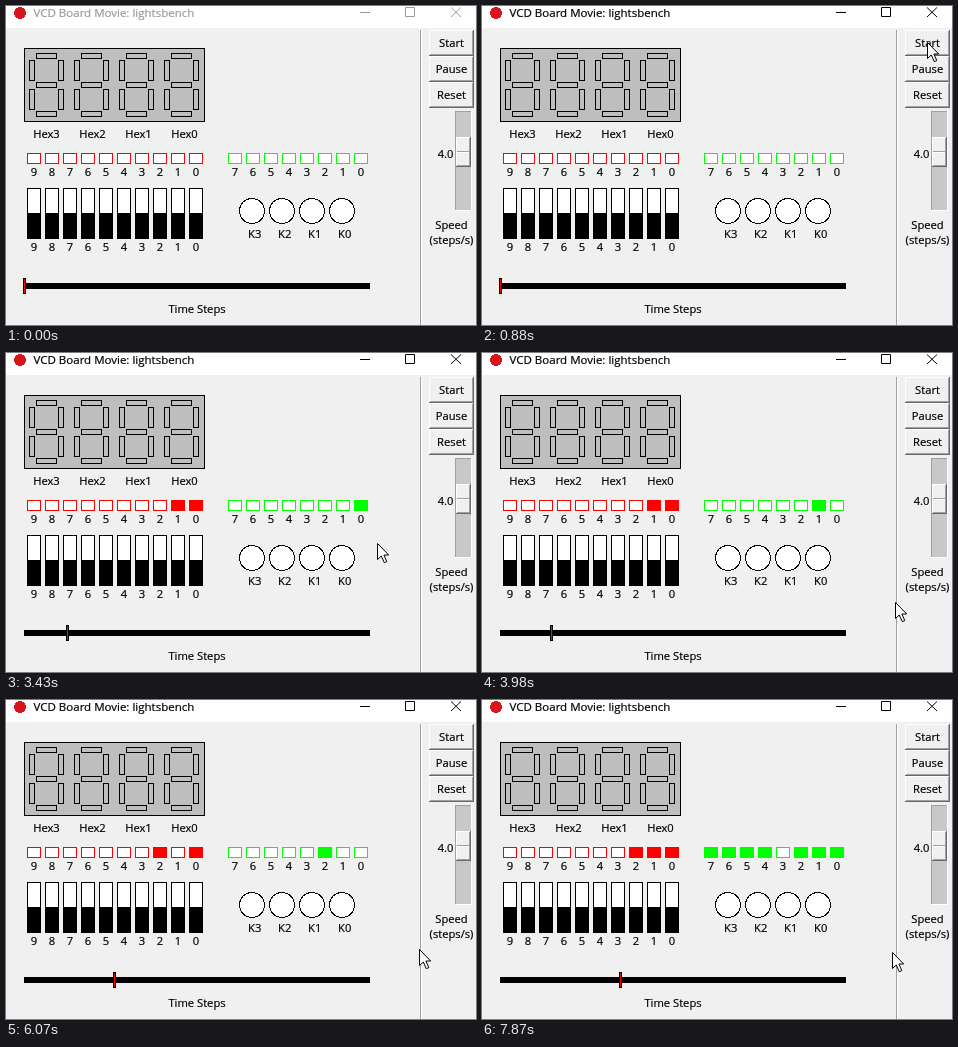
Write an HTML page that moves like this. It is 470 by 319 pixels and loops after 8 s.

```html
<!DOCTYPE html>
<html lang="en">
<head>
<meta charset="utf-8">
<title>VCD Board Movie</title>
<style>
  html, body { margin: 0; width: 100%; height: 100%; overflow: hidden; background: #f0f0f0; }
  svg { display: block; width: 470px; height: 319px; }
  text { font: 11.2px "Open Sans", "Noto Sans", sans-serif; fill: #000; stroke: #000; stroke-width: .2px; }
  circle { shape-rendering: crispEdges; }
</style>
</head>
<body>
<svg id="board" viewBox="0 0 470 319"></svg>
<script>
const board = document.getElementById('board');
const LOOP = 8000;
const STEP_MS = 251;
const FIRST_STEP = 1046;

function add(tag, attrs) {
  const el = document.createElementNS('http://www.w3.org/2000/svg', tag);
  for (const key in attrs) el.setAttribute(key, attrs[key]);
  return board.appendChild(el);
}
const fill = (x, y, w, h, color) => add('rect', { x, y, width: w, height: h, fill: color });
// One-pixel outline whose outer size is w by h
const box = (x, y, w, h, color, stroke) => add('rect', {
  x: x + 0.5, y: y + 0.5, width: w - 1, height: h - 1, fill: color, stroke
});
function label(str, x, y, anchor = 'middle') {
  const el = add('text', { x, y, 'text-anchor': anchor });
  el.textContent = str;
  return el;
}
function raised(x, y, w, h) {
  fill(x, y, w, h, '#696969');
  fill(x, y, w - 1, h - 1, '#fff');
  fill(x + 1, y + 1, w - 2, h - 2, '#a0a0a0');
  fill(x + 1, y + 1, w - 3, h - 3, '#f0f0f0');
}
function sunken(x, y, w, h, color) {
  fill(x, y, w, h, '#fff');
  fill(x, y, w - 1, h - 1, '#a0a0a0');
  fill(x + 1, y + 1, w - 2, h - 2, color);
}

// Window frame
fill(0, 0, 470, 319, '#f0f0f0');
fill(0, 0, 470, 22, '#fff');
add('circle', { cx: 14, cy: 7, r: 6, fill: '#d8141c' });
const title = label('VCD Board Movie: lightsbench', 27.5, 11, 'start');
title.style.fontSize = '11.5px';
const controls = add('path', {
  d: 'M354 6.5h10M399.5 1.5h9v9h-9zM445 1.5l10 9.5M455 1.5l-10 9.5', fill: 'none'
});
fill(414, 24, 1, 295, '#a0a0a0');
fill(415, 24, 1, 295, '#fff');

// Side panel
['Start', 'Pause', 'Reset'].forEach((name, i) => {
  raised(423, 24 + 26 * i, 45, 26);
  label(name, 445.5, 41 + 26 * i);
});
sunken(449, 105, 17, 100, '#c8c8c8');
raised(450, 131, 15, 30);
fill(451, 145, 12, 1, '#a0a0a0');
fill(451, 146, 12, 1, '#fff');
label('4.0', 447.5, 152, 'end');
label('Speed', 445.5, 223);
label('(steps/s)', 445.5, 238);

// Seven-segment displays
box(18, 42, 181, 74, '#bebebe', '#000');
for (let d = 0; d < 4; d++) {
  const x = 23 + 45 * d;
  for (let bar = 0; bar < 3; bar++) {
    const y = 47 + 29 * bar;
    box(x + 7, y, 21, 6, '#bebebe', '#000');
    if (bar === 2) continue;
    box(x, y + 7, 6, 21, '#bebebe', '#000');
    box(x + 29, y + 7, 6, 21, '#bebebe', '#000');
  }
  label('Hex' + (3 - d), 40.5 + 46 * d, 132);
}

// Rows of lights, indexed by bit
function lights(x, count, color) {
  const row = [];
  for (let bit = 0; bit < count; bit++) {
    const left = x + 18 * (count - 1 - bit);
    row[bit] = box(left, 147, 14, 11, '#fff', color);
    label(bit, left + 7, 170);
  }
  return row;
}
const reds = lights(21, 10, '#f00');
const greens = lights(222, 8, '#0f0');

// Switches and keys
for (let i = 0; i < 10; i++) {
  const x = 21 + 18 * i;
  box(x, 182, 14, 51, '#fff', '#000');
  fill(x, 207, 14, 26, '#000');
  label(9 - i, x + 7, 245);
}
for (let i = 0; i < 4; i++) {
  add('circle', { cx: 246 + 30 * i, cy: 205, r: 12.5, fill: '#fff', stroke: '#000' });
  label('K' + (3 - i), 248.7 + 30 * i, 232);
}

// Timeline
fill(18, 277, 346, 6, '#000');
label('Time Steps', 191, 307);
const handle = box(17, 272, 3, 16, '#f00', '#000');

const pointer = add('path', {
  d: 'M.5 .5V16.5L4.3 13L7.3 19.7L9.8 18.6L6.9 12H11.7Z',
  fill: '#fff', stroke: '#000'
});

// [ms, x, y] of the pointer tip
const path = [
  [60, 462, 316], [740, 445, 36], [900, 445, 36], [1070, 362, 133], [3220, 362, 133],
  [3350, 374, 172], [3430, 371, 190], [3850, 413, 249], [7700, 413, 249], [7840, 410, 252]
];

function pointerAt(t) {
  const i = path.findIndex(p => p[0] > t);
  if (i < 0) return path[path.length - 1].slice(1);
  const [t0, x0, y0] = path[i - 1], [t1, x1, y1] = path[i];
  const p = (t - t0) / (t1 - t0);
  return [Math.round(x0 + (x1 - x0) * p), Math.round(y0 + (y1 - y0) * p)];
}

function paint(row, bits, color) {
  row.forEach((el, bit) => el.setAttribute('fill', bits >> bit & 1 ? color : '#fff'));
}

// The bench changes a signal every 3.5 steps
const redBits = phase => phase < 1 ? 0 : phase < 6 ? 3 : phase < 8 ? 5 : 7;
const greenBits = phase => phase < 7 ? Math.max(0, Math.min(4, phase - 1)) : 0xf7;

function draw(t) {
  const active = t >= 800;
  title.style.fill = title.style.stroke = active ? '#000' : '#999';
  controls.setAttribute('stroke', active ? '#000' : '#999');

  const step = Math.max(0, Math.floor((t - FIRST_STEP) / STEP_MS) + 1);
  const phase = Math.floor(step / 3.5);
  paint(reds, redBits(phase), '#f00');
  paint(greens, greenBits(phase), '#0f0');
  handle.setAttribute('x', Math.floor(17 + 4.31 * step) + 0.5);

  const shown = t >= path[0][0];
  pointer.setAttribute('visibility', shown ? 'visible' : 'hidden');
  if (shown) pointer.setAttribute('transform', `translate(${pointerAt(t)})`);
}

const start = performance.now();
function loop() {
  draw((performance.now() - start) % LOOP);
  requestAnimationFrame(loop);
}
loop();
</script>
</body>
</html>
```
